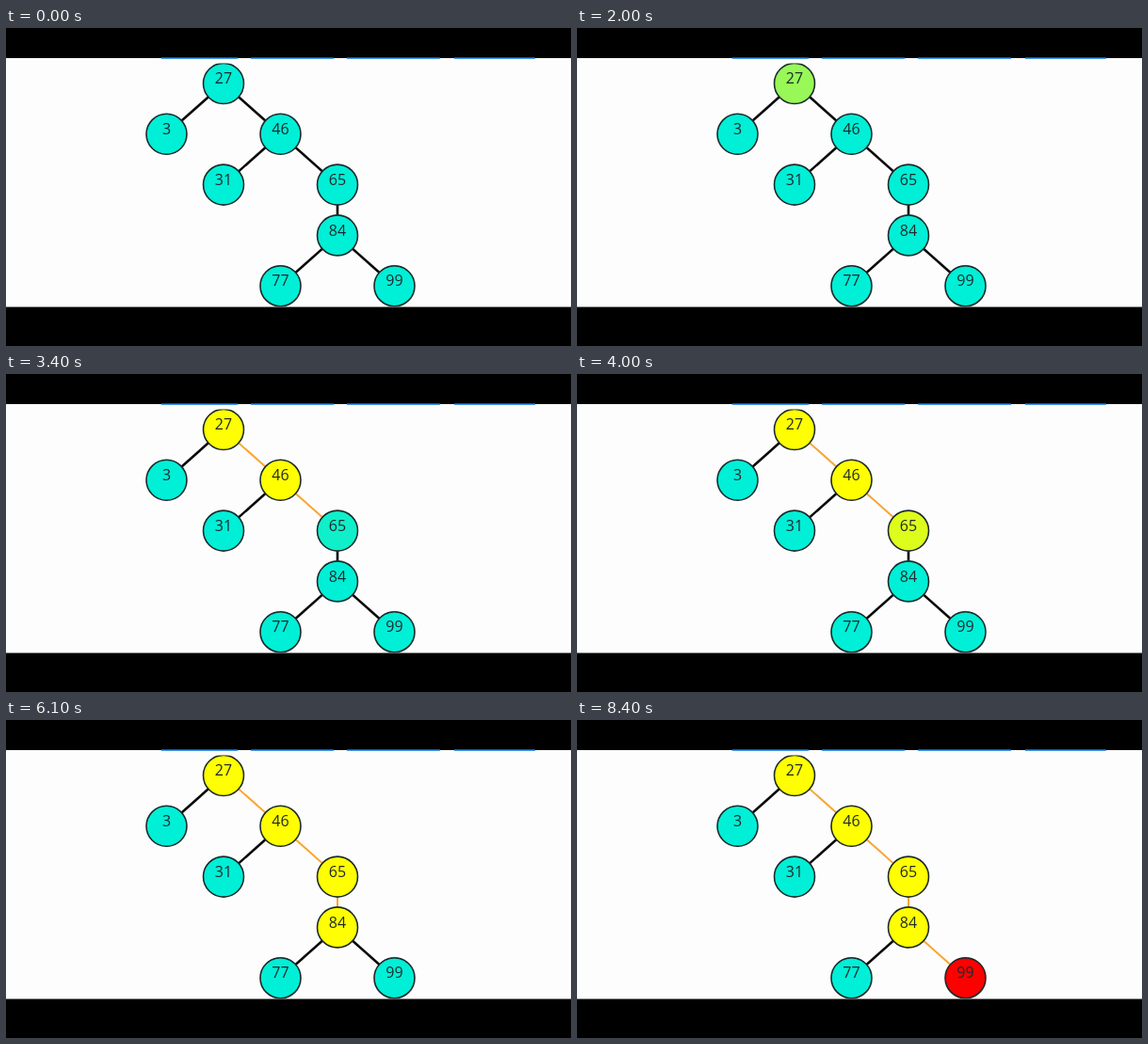
An HTML page that plays this animation: 600 by 338 pixels, repeating every 8600 ms.

```html
<!DOCTYPE html>
<html lang="en">
<head>
<meta charset="utf-8">
<title>Tree search</title>
<style>
  html, body { margin: 0; width: 100%; height: 100%; overflow: hidden; background: #000; }
  svg { display: block; width: 100vw; height: 100vh; }
  text { font: 16px "Open Sans", "Noto Sans", sans-serif; text-anchor: middle; fill: #1f2a2a; }
  circle { stroke: #1c2a2a; stroke-width: 1.6; }
</style>
</head>
<body>
<svg viewBox="0 0 600 338">
  <defs><clipPath id="page"><rect y="37.5" width="600" height="259"/></clipPath></defs>
  <rect width="600" height="338" fill="#000"/>
  <rect y="32" width="600" height="264.5" fill="#fdfdfd"/>
  <path d="M165 32H246M260 32H348M362 32H461M476 32H562" stroke="#0878e8" stroke-width="1.6"/>
  <g clip-path="url(#page)"><g id="edges"></g><g id="nodes"></g></g>
</svg>
<script>
const LOOP = 8600, STEP = 100, FADE = 1200, R = 21.5;
const CYAN = [0, 239, 215], YELLOW = [255, 255, 0], RED = [255, 0, 0];

// column and row sit on a regular grid; start is when the search reaches the node
const nodes = [
  { label: 27, col: 1, row: 0, start: 1590, to: YELLOW },
  { label: 3, col: 0, row: 1, parent: 0 },
  { label: 46, col: 2, row: 1, parent: 0, start: 2250, to: YELLOW },
  { label: 31, col: 1, row: 2, parent: 2 },
  { label: 65, col: 3, row: 2, parent: 2, start: 3310, to: YELLOW },
  { label: 84, col: 3, row: 3, parent: 4, start: 4960, to: YELLOW },
  { label: 77, col: 2, row: 4, parent: 5 },
  { label: 99, col: 4, row: 4, parent: 5, start: 7080, to: RED }
];

function add(parent, tag, attrs) {
  const el = document.createElementNS("http://www.w3.org/2000/svg", tag);
  for (const key in attrs) el.setAttribute(key, attrs[key]);
  return parent.appendChild(el);
}

const edgeLayer = document.getElementById("edges");
const nodeLayer = document.getElementById("nodes");

for (const n of nodes) {
  n.x = 170.5 + 60.5 * n.col;
  n.y = 59 + 53.8 * n.row;
  if (n.parent !== undefined) {
    const p = nodes[n.parent];
    n.edge = add(edgeLayer, "line", { x1: p.x, y1: p.y, x2: n.x, y2: n.y });
  }
  n.disc = add(nodeLayer, "circle", { cx: n.x, cy: n.y, r: R });
  add(nodeLayer, "text", { x: n.x, y: n.y + 0.2 }).textContent = n.label;
}

// cubic-bezier(.25, .1, .25, 1)
function ease(p) {
  if (p <= 0 || p >= 1) return Math.min(1, Math.max(0, p));
  const curve = (a, b, s) => 3 * a * s * (1 - s) ** 2 + 3 * b * s * s * (1 - s) + s ** 3;
  let lo = 0, hi = 1;
  for (let i = 0; i < 20; i++) {
    const mid = (lo + hi) / 2;
    if (curve(0.25, 0.25, mid) < p) lo = mid; else hi = mid;
  }
  return curve(0.1, 1, lo);
}

const mix = (a, b, k) => `rgb(${a.map((v, i) => Math.round(v + (b[i] - v) * k))})`;

function draw(time) {
  const t = Math.floor((time % LOOP) / STEP) * STEP;
  for (const n of nodes) {
    const reached = n.start !== undefined && t >= n.start;
    const k = reached ? ease((t - n.start) / FADE) : 0;
    n.disc.setAttribute("fill", mix(CYAN, n.to || CYAN, k));
    if (n.edge) {
      n.edge.setAttribute("stroke", reached ? "#f9a532" : "#0a0a0a");
      n.edge.setAttribute("stroke-width", reached ? 2 : 2.6);
    }
  }
}

let origin;
function tick(now) {
  if (origin === undefined) origin = now;
  draw(now - origin);
  requestAnimationFrame(tick);
}
draw(0);
requestAnimationFrame(tick);
</script>
</body>
</html>
```
